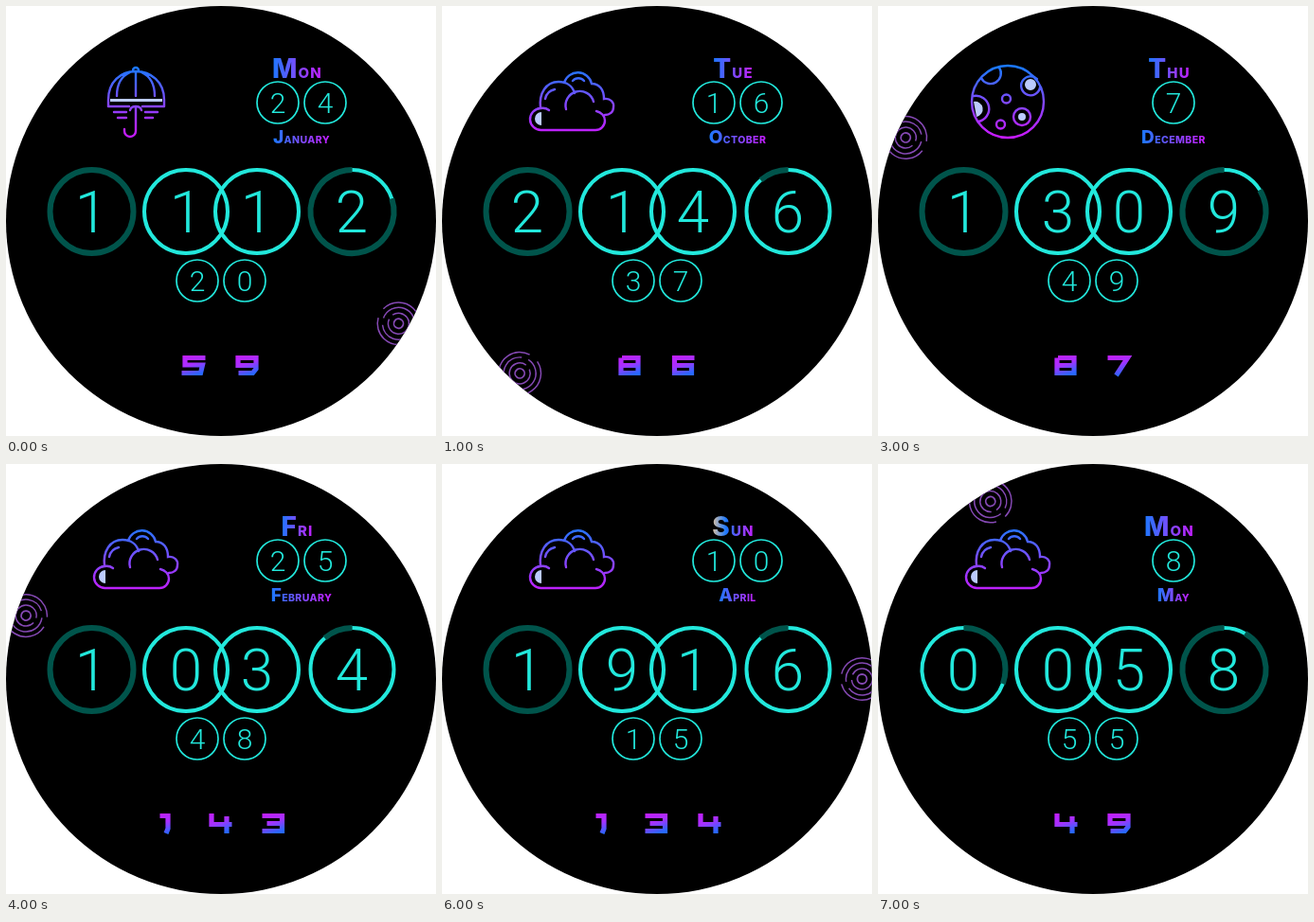
An HTML page with a canvas for the animation above (8 s loop, 454 by 454 pixels).

```html
<!DOCTYPE html>
<html>
<head>
<meta charset="utf-8">
<style>
html, body { margin: 0; width: 100%; height: 100%; overflow: hidden; background: #fff; }
canvas { display: block; }
</style>
</head>
<body>
<canvas id="face" width="454" height="454"></canvas>
<script>
const ctx = document.getElementById('face').getContext('2d');
const BRIGHT = '#22e8dc', DIM = '#00544b', PALE = '#bccbff';
const BLUE = '#1b78ff', VIOLET = '#7c4cff', MAGENTA = '#c41cff';

// rings: bright span in degrees, clockwise from the top
const states = [
  { day: 'Mon', date: '24', month: 'January', time: '111220', pulse: '59', icon: 'umbrella', left: [0, 0], right: [0, 72] },
  { day: 'Tue', date: '16', month: 'October', time: '214637', pulse: '86', icon: 'cloud', left: [0, 0], right: [0, 319] },
  { day: 'Wed', date: '2', month: 'November', time: '015552', pulse: '156', icon: 'bolt', left: [0, 0], right: [0, 319] },
  { day: 'Thu', date: '7', month: 'December', time: '130949', pulse: '87', icon: 'moon', left: [0, 0], right: [0, 59] },
  { day: 'Fri', date: '25', month: 'February', time: '103448', pulse: '143', icon: 'cloud', left: [0, 0], right: [0, 319] },
  { day: 'Sat', date: '4', month: 'March', time: '082909', pulse: '96', icon: 'bolt', left: [148, 360], right: [0, 36] },
  { day: 'Sun', date: '10', month: 'April', time: '191615', pulse: '134', icon: 'cloud', left: [0, 0], right: [0, 319] },
  { day: 'Mon', date: '8', month: 'May', time: '005855', pulse: '49', icon: 'cloud', left: [110, 360], right: [0, 30] }
];

const blockDigits = {
  1: 'M5 2.5H13.5V16L11.5 21',
  3: 'M1 2.5H22V18.5H1M6 10.5H22',
  4: 'M3.5 0V11.5H25M19.5 3V21',
  5: 'M25 2.5H3.5V10H22L20 18.5H0',
  6: 'M25 2.5H4V18.5H22V10.5H4',
  7: 'M1 2.5H22L10 21',
  8: 'M4.5 2.5H21.5V18.5H3.5V2.5M4 10.5H22',
  9: 'M22 10.5H3.5V2.5H22.5V14L19 18.5H4'
};

// lines take the vertical gradient, fills are pale
const icons = {
  umbrella: {
    line: 'M108 106V99C108 80 121 69 137 69S167 80 167 99V106M137 69V95M117 95C117 83 122 74 131 70M157 95C157 83 152 74 143 70' +
      'M134 68A3 3 0 1 1 140 68M108 106H130M144 106H167M114 112H127M147 112H160M118 118H127M147 118H155' +
      'M131 110A6 5 0 0 1 137 106A6 5 0 0 1 143 110M137 107V132A6 6 0 0 1 125 132V130',
    fill: 'M110 98H165V101H110Z'
  },
  bolt: {
    line: 'M150 64Q155 61 154 67L147 90H161Q166 91 163 95L127 136Q121 141 121 134L129 110H112Q108 109 111 105Z',
    fill: 'M143 81L122 104L134 103L127 118L152 97L139 98Z'
  },
  moon: {
    line: 'M99 101A38 38 0 1 1 175 101A38 38 0 1 1 99 101M109 76A11 11 0 1 0 128 65M168 77A10 10 0 1 0 171 86' +
      'M101 95A13 13 0 1 1 106 122M143 117A9 9 0 1 1 161 117A9 9 0 1 1 143 117' +
      'M131 98A4.5 4.5 0 1 1 140 98A4.5 4.5 0 1 1 131 98M125 125A4.5 4.5 0 1 1 134 125A4.5 4.5 0 1 1 125 125',
    fill: 'M155 83A6 6 0 1 1 167 83A6 6 0 1 1 155 83M148 117A4 4 0 1 1 156 117A4 4 0 1 1 148 117M101 101A8 8 0 0 1 104 117Z'
  },
  cloud: {
    line: 'M105 131H162A10 10 0 0 0 172 121C172 116 168 112 163 111M105 131A11 11 0 0 1 104 108' +
      'C102 92 110 80 123 80C132 80 138 85 140 92M131 109A15 15 0 0 1 160 101M109 98A13 13 0 0 1 119 88' +
      'M104 108Q109 107 113 110M129 81A15 15 0 0 1 158 82C166 82 171 88 171 98C178 97 182 102 181 107C181 112 177 115 172 115M138 79A8 8 0 0 1 150 79',
    fill: 'M105 112A7 7 0 0 0 105 126Z'
  }
};

function gradient(x0, y0, x1, y1, colors) {
  const g = ctx.createLinearGradient(x0, y0, x1, y1);
  colors.forEach((c, i) => g.addColorStop(i / (colors.length - 1), c));
  return g;
}

function arc(x, y, r, from, to, width, color) {
  ctx.beginPath();
  ctx.arc(x, y, r, (from - 90) * Math.PI / 180, (to - 90) * Math.PI / 180);
  ctx.lineWidth = width;
  ctx.strokeStyle = color;
  ctx.stroke();
}

function digit(char, x, baseline, size) {
  ctx.font = `300 ${size}px Roboto, sans-serif`;
  ctx.textAlign = 'center';
  ctx.fillStyle = BRIGHT;
  ctx.fillText(char, x, baseline);
}

function progressRing(x, [from, to]) {
  arc(x, 217, 44, to, from + 360, 6, DIM);
  if (to > from) arc(x, 217, 44, from, to, 4, BRIGHT);
}

function smallDigit(char, x, y) {
  arc(x, y, 22, 0, 360, 1.7, BRIGHT);
  digit(char, x, y + 11, 30);
}

// Word with a large initial and small capitals
function label(word, center, baseline, big, small, spacing, colors) {
  const parts = [[word[0], big], [word.slice(1).toUpperCase(), small]];
  const useFont = size => {
    ctx.font = `800 ${size}px Inter, sans-serif`;
    ctx.letterSpacing = spacing + 'px';
  };
  const widths = parts.map(([text, size]) => (useFont(size), ctx.measureText(text).width));
  const total = widths[0] + widths[1];
  let x = center - total / 2;
  ctx.fillStyle = gradient(x, 0, x + total, 0, colors);
  ctx.textAlign = 'left';
  parts.forEach(([text, size], i) => {
    useFont(size);
    ctx.fillText(text, x, baseline);
    x += widths[i];
  });
  ctx.letterSpacing = '0px';
}

function drawIcon({ line, fill }) {
  ctx.strokeStyle = gradient(0, 65, 0, 135, [BLUE, VIOLET, MAGENTA]);
  ctx.lineWidth = 2.4;
  ctx.lineCap = 'round';
  ctx.stroke(new Path2D(line));
  ctx.lineCap = 'butt';
  ctx.fillStyle = PALE;
  ctx.fill(new Path2D(fill));
}

function drawPulse(text) {
  ctx.lineWidth = 5.2;
  ctx.strokeStyle = gradient(0, 0, 8, 23, [MAGENTA, '#a830ff', '#2868ff']);
  [...text].forEach((char, i) => {
    ctx.save();
    ctx.translate(226 + (i - (text.length - 1) / 2) * 56 - 12.5, 369);
    ctx.stroke(new Path2D(blockDigits[char]));
    ctx.restore();
  });
}

// Ripple that circles the rim with the seconds
function drawRipple(seconds) {
  const color = '#8549b4';
  ctx.save();
  ctx.translate(227, 227);
  ctx.rotate(seconds * Math.PI / 30);
  ctx.translate(0, -216.5);
  arc(0, 0, 5, 0, 360, 1.8, color);
  arc(0, 0, 11, 205, 535, 1.5, color);
  arc(0, 0, 17, 170, 505, 1.5, color);
  arc(0, 0, 22.3, 194, 526, 1.5, color);
  ctx.restore();
}

function draw(state) {
  const { day, date, month, time, pulse, icon, left, right } = state;
  ctx.clearRect(0, 0, 454, 454);
  ctx.save();
  ctx.beginPath();
  ctx.arc(227, 227, 227, 0, 2 * Math.PI);
  ctx.fillStyle = '#000';
  ctx.fill();
  ctx.clip();

  drawRipple(+time.slice(4));
  drawIcon(icons[icon]);
  const dayColors = [BLUE, VIOLET, MAGENTA];
  label(day, 307.5, 76, 28, 15, 1.2, day === 'Sun' ? ['#e0c4a0', ...dayColors] : dayColors);
  label(month, 312, 145, 19, 10.5, 0.4, dayColors);
  [...date].forEach((char, i) => smallDigit(char, 312 + (i - (date.length - 1) / 2) * 50, 102));

  progressRing(90.5, left);
  progressRing(365.5, right);
  arc(190, 217, 44, 0, 360, 4, BRIGHT);
  arc(265, 217, 44, 0, 360, 4, BRIGHT);
  [90, 190, 265, 365].forEach((x, i) => digit(time[i], x, 239, 62));
  smallDigit(time[4], 202, 290);
  smallDigit(time[5], 252, 290);
  drawPulse(pulse);
  ctx.restore();
}

const start = performance.now();
function tick() {
  const elapsed = performance.now() - start;
  draw(states[Math.floor(elapsed / 1000) % states.length]);
  requestAnimationFrame(tick);
}
tick();
</script>
</body>
</html>
```
